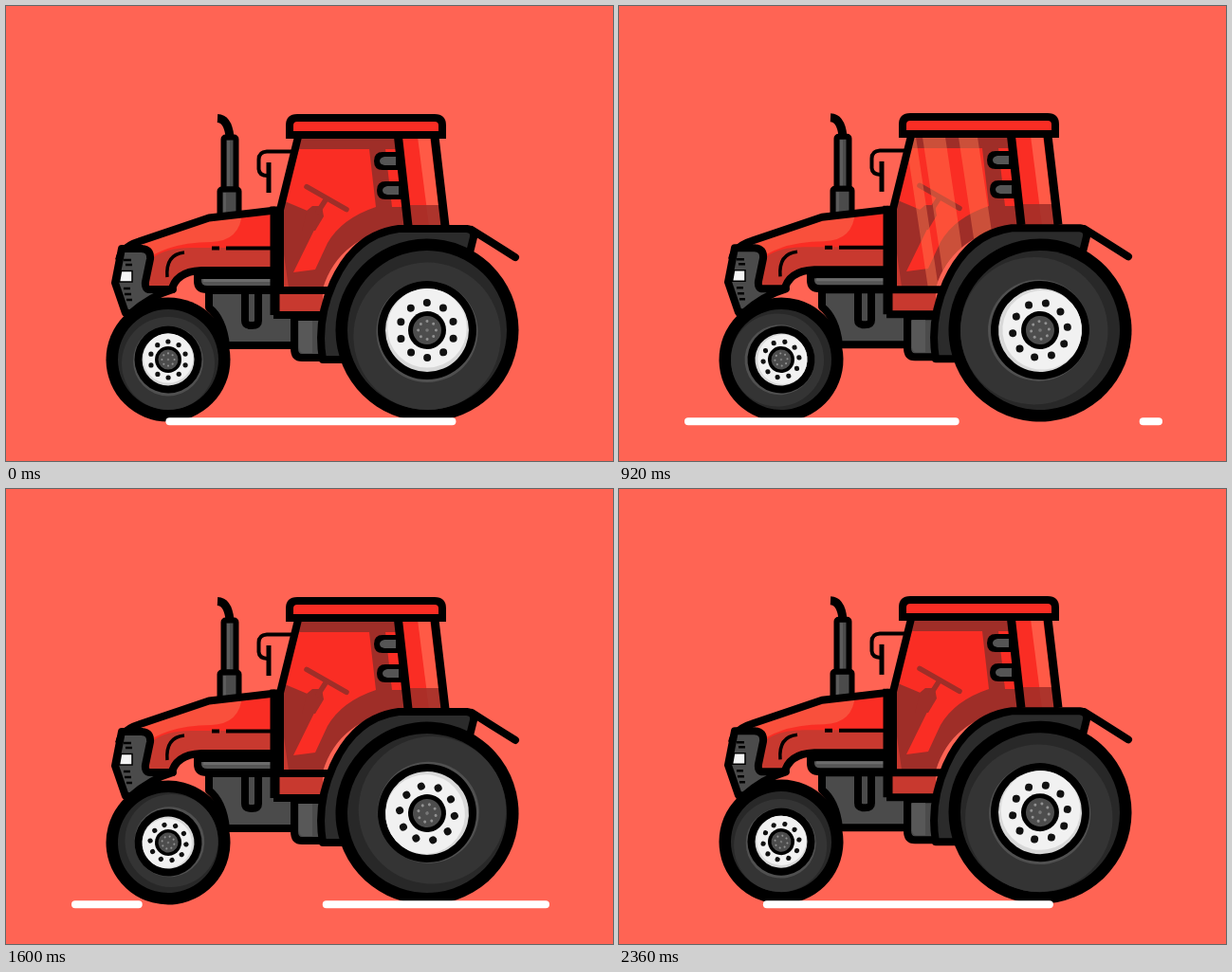
An HTML page that plays this animation: 640x480 px, repeating every 2.4 s.

```html
<!DOCTYPE html>
<html lang="en">
<head>
<meta charset="utf-8">
<title>Red tractor</title>
<style>
  html, body { margin: 0; width: 100%; height: 100%; overflow: hidden; background: #ff6454; }
  svg { display: block; width: 100vw; height: 100vh; }
  .ink { stroke: #000; stroke-width: 8; stroke-linejoin: round; }
  .line { fill: none; stroke: #000; stroke-width: 8; }
  .red { fill: #fa2d24; }
  .mid { fill: #c8392f; }
  .deep { fill: #9f2e28; }
  .light { fill: #ff5a46; }
  .grey { fill: #4b4b4b; }
</style>
</head>
<body>
<svg viewBox="0 0 640 480">
  <defs>
    <clipPath id="glass"><path d="M308 138H413L424 232Q352 240 334 298H289V215Z"/></clipPath>
    <clipPath id="hoodClip"><path d="M284 215L214 223L140 249Q152 253 153 266L149 299H174Q179 279 206 279H284Z"/></clipPath>
    <clipPath id="rearGlass"><path d="M413 138H452L464 232H424Z"/></clipPath>
  </defs>

  <g id="body">
    <!-- chassis -->
    <path class="ink grey" d="M214 300H304V358H232Q229 330 214 318Z"/>
    <path class="line" d="M252 300V332Q252 337 259 337Q266 337 266 332V300"/>
    <path class="ink" fill="#555" d="M202 284H288V299H212Q202 299 202 290Z"/>
    <path fill="#6c6c6c" d="M208 288H282V291H208Z"/>
    <path class="ink grey" d="M304 328H352V371H312Q304 371 304 361Z"/>
    <path fill="#585858" d="M309 332H323V366H314Q309 366 309 360Z"/>

    <!-- exhaust -->
    <path d="M223 118.500Q234 119 236 138" fill="none" stroke="#000" stroke-width="9"/>
    <rect class="ink grey" x="229.500" y="138.500" width="13" height="55" rx="2" style="stroke-width:6"/>
    <rect class="ink grey" x="225.500" y="193.500" width="20" height="34" rx="2" style="stroke-width:6"/>
    <path fill="#5c5c5c" d="M233 142H236V190H233ZM229 197H232V222H229Z"/>

    <!-- hood -->
    <g clip-path="url(#hoodClip)">
      <path class="mid" d="M130 210H290V310H130Z"/>
      <path class="red" d="M284 210L214 220L136 246L154 266Q170 254 200 255H284Z"/>
      <path fill="#f9503c" d="M130 248L214 220L249 216Q248 248 216 249Q178 249 153 264Z"/>
    </g>
    <path class="line" d="M170 286Q168 262 188 260" style="stroke-width:3.500"/>
    <path class="line" d="M217 255.500H225M232 255.500H284" style="stroke-width:4"/>
    <path class="line" stroke-linejoin="round" d="M284 215.500L214 223.500L140 248.500Q122 254 119 268M284 279H206Q178 280 174 302"/>

    <!-- grille -->
    <path class="ink grey" d="M122 256H143Q153 257 152 267L147 291Q146 299 152 299H176Q152 306 132 324H126L115 292Z"/>
    <path d="M124 268H132M126 273H133M124 298H131M125 304H132M127 310H133" class="line" style="stroke-width:2.500"/>
    <path d="M121.500 279.500H133V291H119.500Z" stroke="#000" stroke-width="1.500" fill="#f4f4f4"/>
  </g>

  <g id="cab">
    <path class="line" d="M306 153.500H275Q266.500 154 266.500 162V172Q267 179 276 179" style="stroke-width:4"/>
    <path class="line" d="M277 165V197" style="stroke-width:5"/>

    <g clip-path="url(#glass)">
      <path class="deep" d="M280 130H430V310H280Z"/>
      <path class="red" d="M309 151H383L390 212Q354 224 339 250L326 278L303 281L332 222L294 206Z"/>
      <path class="red" d="M400 151H420V212H407Z"/>
      <path class="mid" d="M289 234L298 297H289Z"/>
      <path class="deep" d="M317 216L323 211H333L335 222L326 237H312Z"/>
      <path d="M317 190.500L359 214.500M338 203L329 217" stroke="#9f2e28" stroke-width="5.500" stroke-linecap="round"/>
      <g id="glare" fill="#ff7a50" opacity=".45">
        <path d="M-38 130H-27L0 310H-11ZM-20 130H4L31 310H7ZM18 130H38L65 310H45Z"/>
      </g>
    </g>

    <g clip-path="url(#rearGlass)">
      <path class="red" d="M405 130H475V240H405Z"/>
      <path class="light" d="M434 138H447L459 232H446Z"/>
      <path class="deep" d="M410 210H475V240H410Z" opacity=".85"/>
    </g>

    <g id="lamp">
      <path d="M416 154H397Q388 154 388 163.500Q388 173 397 173H416Z"/>
      <path fill="#555" d="M411 159H399Q394 160 394 163.500Q394 167 399 168H411Z"/>
    </g>
    <use href="#lamp" x="3" y="31"/>
    <path class="line" d="M413.500 138L424 232M452 138L463 232" style="stroke-width:9"/>
    <path class="line" d="M308 138L289 215V300"/>
    <path class="ink red" style="stroke-linejoin:miter" d="M299 136V126Q299 118 307 118H452Q460 118 460 126V136Z"/>
  </g>

  <g id="fender">
    <path class="mid" d="M286 303H334V326H286Z"/>
    <path class="line" d="M283.500 211.500V326" style="stroke-width:10"/>
    <path class="line" d="M284 300H340M282 326H334"/>
    <path class="line" stroke-linecap="round" d="M491 236L537 265"/>
    <path class="ink" fill="#2b2b2b" d="M360 373H334Q327 332 345 292Q368 241 414 235H486Q494 236 493 244L488 264L440 320Z"/>
  </g>

  <g id="wheels"></g>
  <path id="ground" d="M73 438.300H569" fill="none" stroke="#fff" stroke-width="8"
        stroke-linecap="round" stroke-dasharray="298 198"/>
</svg>

<script>
  const LOOP = 2400, TAU = Math.PI * 2;
  const $ = id => document.getElementById(id);
  const disc = (r, fill, x = 0, y = 0) =>
    `<circle cx="${x}" cy="${y}" r="${r}" fill="${fill}"/>`;

  function ring(n, radius, r, fill) {
    let out = '';
    for (let i = 0; i < n; i++) {
      const a = i / n * TAU;
      out += disc(r, fill, radius * Math.sin(a), -radius * Math.cos(a));
    }
    return out;
  }

  // tread, black collar, pale rim with ten holes, dark hub
  function makeWheel(s) {
    const inner = s.tyre * .925;
    return `<g id="${s.id}">` +
      disc(s.outer, '#000') + disc(s.tyre, '#282828') +
      disc(inner, '#343434', 0, s.tyre - inner) +
      disc(s.collar + 1.5, '#505050', 0, 1.5) + disc(s.collar, '#000') +
      disc(s.rim, '#d8d8d8') + disc(s.rim * .95, '#f1f1f1', 0, -s.rim * .05) +
      ring(10, s.holes, s.hole, '#111') +
      disc(s.hub, '#000') + disc(s.hub * .75, '#4d4d4d') +
      ring(8, s.hub * .47, s.hub * .075, '#929292') + disc(s.hub * .09, '#777') +
      '</g>';
  }

  const wheels = [
    { id: 'rear', x: 444, y: 342, outer: 96.5, tyre: 84, collar: 52,
      rim: 44, holes: 29, hole: 4, hub: 20 },
    { id: 'front', x: 171, y: 373, outer: 65.5, tyre: 53, collar: 35.5,
      rim: 27.5, holes: 19, hole: 2.6, hub: 14 }
  ];
  $('wheels').innerHTML = wheels.map(makeWheel).join('');

  const move = (id, x, y, turn = 0) =>
    $(id).setAttribute('transform', `translate(${x} ${y}) rotate(${turn})`);

  // wheels rest for half a beat, then kick up fast and settle slowly
  function hop(t) {
    const u = Math.max(0, t % 400 / 200 - 1);
    return 4 * Math.sin(Math.PI * Math.cbrt(u));
  }

  function draw(now) {
    const t = now % LOOP, p = t / LOOP;

    const sway = Math.cos((t - 80) / 480 * TAU) - .5;
    move('body', 0, 1.4 * sway);
    move('fender', 0, 1.4 * sway);
    move('cab', 0, 2.3 * sway);

    for (const w of wheels) move(w.id, w.x, w.y - hop(t), -720 * p);

    $('ground').setAttribute('stroke-dashoffset', -99 - 992 * p);

    // one reflection crosses the windscreen per loop
    move('glare', 338 + (t - 920) * .6, 0);
    requestAnimationFrame(draw);
  }
  draw(performance.now());
</script>
</body>
</html>
```
